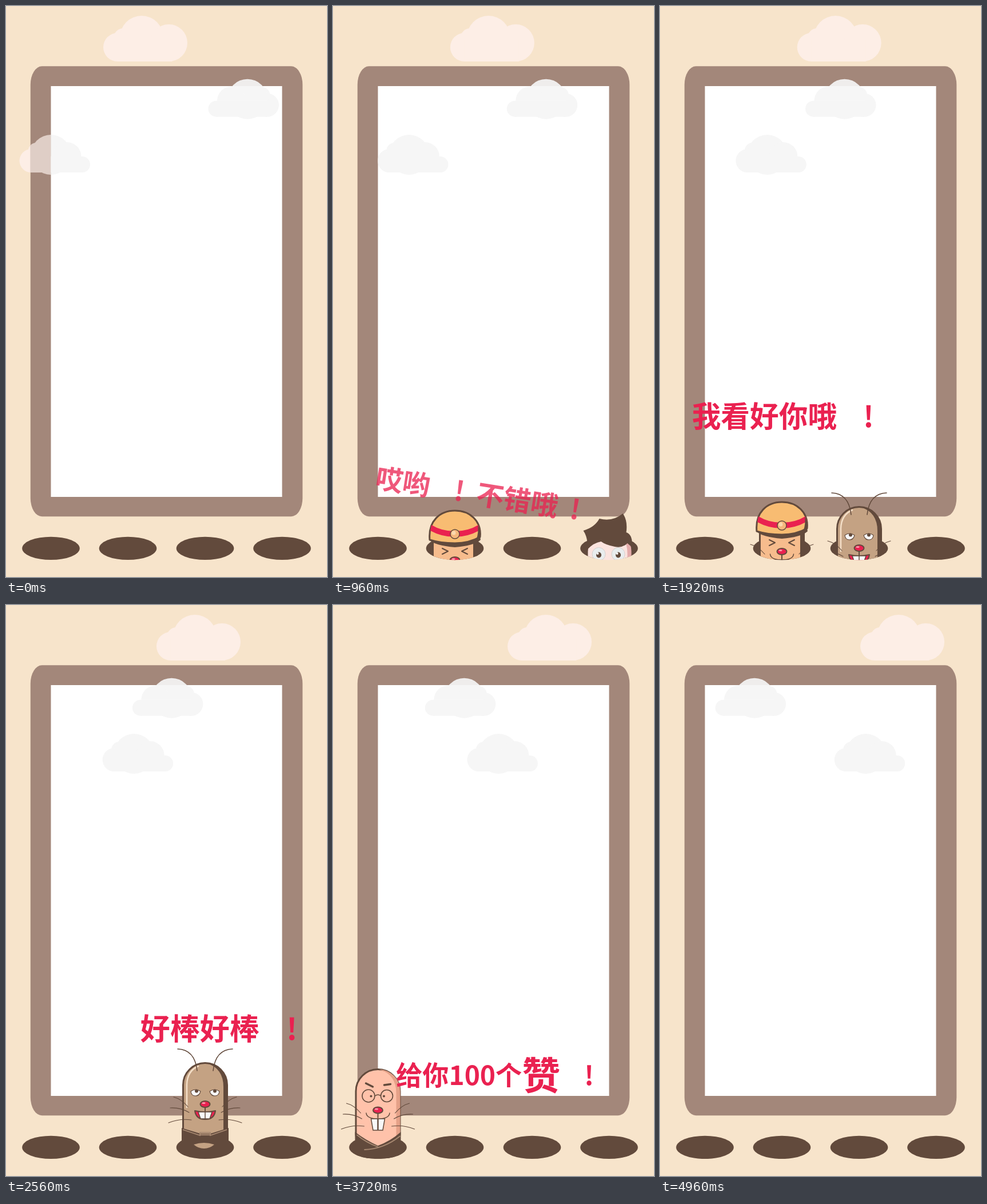
Write an HTML page that moves like this. It is 561x998 px and loops after 5 s.

```html
<!DOCTYPE html>
<html lang="zh">
<head>
<meta charset="utf-8">
<title>打地鼠</title>
<style>
html, body { margin: 0; width: 100%; height: 100%; overflow: hidden; background: #f7e4cb; }
svg { display: block; width: 100%; height: 100%; }
.ln { fill: none; stroke: #624a3c; stroke-width: 1.6; stroke-linecap: round; stroke-linejoin: round; }
.ol { stroke: #624a3c; stroke-width: 3; stroke-linejoin: round; }
.mid { stroke-width: 2; }
.thin { stroke-width: 1.5; }
.hair { stroke-width: 1.1; }
.bold { stroke-width: 3.4; }
.dk { fill: #624a3c; }
.red { fill: #ea2150; }
.wh { fill: #f8f8f9; }
.hem { fill: none; stroke: #a98a72; stroke-width: 1.8; }
text { font-family: "Noto Sans CJK SC", "Noto Sans CJK", sans-serif; font-weight: 900; fill: #ea2150; text-anchor: middle; white-space: pre; }
.big { font-size: 1.45em; }
</style>
</head>
<body>
<svg viewBox="0 0 561 998">
  <defs>
    <g id="puff">
      <circle cx="44" cy="270.5" r="20.5"/><circle cx="53" cy="253" r="14"/>
      <circle cx="78.5" cy="260" r="35"/><circle cx="106.5" cy="263" r="25"/>
      <circle cx="133" cy="277" r="14"/><path d="M44 263H133V291H44Z"/>
    </g>
    <clipPath id="pane"><path d="M78.5 140H482.5V858H78.5Z"/></clipPath>
    <clipPath id="edge"><path clip-rule="evenodd" d="M43 105H518V892H43ZM78.5 140V858H482.5V140Z"/></clipPath>
    <clipPath id="mouth"><path d="M-200 0H200V948H50.3A50.3 20.2 0 0 1-50.3 948H-200Z"/></clipPath>
  </defs>
  <rect width="561" height="998" fill="#f7e4cb"/>
  <g class="c1" fill="#fdeee6">
    <circle cx="195" cy="72" r="25"/><circle cx="205" cy="56" r="17"/><circle cx="237" cy="55" r="38"/>
    <circle cx="284.5" cy="64.5" r="32.5"/><path d="M195 60H290V97H195Z"/>
  </g>
  <use class="c3" href="#puff" fill="#fdeee6"/>
  <rect x="42.8" y="105.3" width="475.5" height="787" rx="20" ry="32" fill="#a3877a"/>
  <path d="M78.5 140H482.5V858H78.5Z" fill="#fff"/>
  <g clip-path="url(#edge)">
    <use class="c3" href="#puff" fill="#dfcec6"/>
    <use class="c2" href="#puff" fill="#efedec"/>
  </g>
  <g clip-path="url(#pane)" fill="#f6f6f6">
    <use class="c3" href="#puff"/>
    <use class="c2" href="#puff"/>
  </g>
  <g id="holes" class="dk"></g>
  <g id="moles"></g>
  <g id="words"></g>
</svg>
<script>
const LOOP = 5000, STEP = 40, SPEED = 0.5, DEPTH = 195;
const DARK = "#624a3c";
const $ = id => document.getElementById(id);
const clamp = v => Math.min(1, Math.max(0, v));

// Drawing parts; x is measured from the middle of the hole
const path = (cls, d, fill) => `<path class="${cls}" d="${d}"${fill ? ` fill="${fill}"` : ""}/>`;
const oval = (cls, x, y, rx, ry = rx) => `<ellipse class="${cls}" cx="${x}" cy="${y}" rx="${rx}" ry="${ry}"/>`;
const both = art => `<g>${art}</g><g transform="scale(-1 1)">${art}</g>`;

const body = (top, skin, shade) =>
  path("ol", `M-38.5 ${top + 38.5}a38.5 38.5 0 0 1 77 0V922a38.5 39 0 0 1-77 0Z`, skin) +
  path("", `M2 ${top}A38 38 0 0 1 39 ${top + 38}V922Q38 946 18 957Q32 944 32 922V${top + 42}Q32 ${top + 9} 2 ${top}Z`, shade);

const nose = y => path("ln mid", `M0 ${y}v13`) + oval("red ol mid", 0, y, 8.5, 5.5) +
  `<ellipse cx="-2.5" cy="${y - 2}" rx="3" ry="1.5" fill="#f79aa9"/>`;

const whiskers = (dy, lines = ["M30 888Q42 874 55 871", "M28 898Q43 889 61 890", "M24 911Q44 908 64 916"]) =>
  `<g transform="translate(0 ${dy})">${both(lines.map(d => path("ln hair", d)).join(""))}</g>`;

const grin = (y, len) => path("ln thin", `M-20.5 ${y - 10}q1 10 20.500 10t20.500-10`) +
  both(path("wh ol thin", `M.5 ${y}h11.5l-3.500 ${len}h-8z`));

const rocker = body(815, "#fbe3de", "#e5acab") +
  path("dk", "M-45 817Q-25 811-17 796Q6 802 24 787Q33 800 30 820Q42 824 40 846L32 839Q23 848 10 845Q-6 842-14 836Q-27 838-38 850V838Q-39 826-45 817Z") +
  [-18, 16].map(x => `<circle cx="${x}" cy="858" r="11.5" fill="#e9edee" stroke="#d3cfcd"/>` +
    oval("dk", x, 859.5, 4.5, 5) + oval("wh", x - 2, 857, 2)).join("") +
  path("ol", "M-17 893H18Q17 951 0 951T-17 893Z", "#c91a45") +
  path("", "M-15 900Q-15 912-13 919H14Q16 912 16 900Z", "#f2637a") +
  path("red", "M-13 921Q0 913 14 921Q10 949 0 949T-13 921Z") +
  path("wh ol thin", "M-10 894H11L9 907H-8ZM.5 894V907") +
  nose(881.5) + whiskers(-9, ["M28 898Q43 889 61 890", "M24 911Q44 908 64 916"]);

const miner = body(810, "#f6bc8d", DARK) +
  path("dk", "M-45 848Q-35 858 0 861Q35 858 45 848L41 835H-41Z") +
  path("ol", "M-44 848C-47 815-26 797 0 797S47 815 44 843Q25 854 0 854T-44 848Z", "#f8bc72") +
  path("red", "M-41 822Q-23 833 0 833T41 822L44 831Q23 843 0 843T-43 832Z") +
  path("dk", "M40 822Q47 835 44 848L36 851Q42 838 40 822Z") +
  `<g fill="#f5b77c">${oval("ol thin", 0, 838, 8)}</g><circle cx="-2" cy="836" r="3.5" fill="#fbd9ae"/>` +
  both(path("ln mid", "M22 863L12 868L22 873")) +
  grin(898, 28) + path("ln thin", "M0 926v10") + nose(883.5) + whiskers(0);

const bug = body(800.5, "#c4a283", DARK) +
  `<path d="M-32 878V838Q-31 814-12 806" fill="none" stroke="#f4dfc8" stroke-width="2.5" stroke-linecap="round"/>` +
  both(path("ln", "M14 814Q18 777 48 776") +
    path("wh ol hair", "M8 850Q17 844 25 850Q24 858 17 858T8 850Z")) +
  [-15, 17].map(x => oval("dk", x, 849.5, 3)).join("") +
  path("red ol mid", "M-18 884Q0 888 18 884Q16 899 0 899T-18 884Z") +
  path("wh ol thin", "M-12 886H12L8 898H-8ZM0 886V898") +
  nose(872.5) + whiskers(-11) +
  path("dk", "M-41 914L-8 924H9L41 914V962H-41Z") +
  path("hem", "M-39 917L-9 927V922H9V927L38 917M-9 926H9") +
  path("", "M-20 943Q-2 937 16 943Q8 950-2 950T-20 943Z", "#c4a283");

const scholar = body(808.5, "#ffc2aa", "#e5a188") +
  path("ln bold", "M-21 833L-9 839M11 836L22 834.5") +
  path("ln", "M-5 855q5-4 10 0") +
  oval("ln", -16.5, 855, 11) + oval("ln", 15.5, 855, 10.5) +
  oval("dk", -12, 855.5, 2) + oval("dk", 10.5, 855.5, 2) +
  grin(895, 20) + nose(880) + whiskers(-3) +
  path("dk", "M-40 918Q-22 932 0 942Q22 934 40 918V964H-40Z") +
  path("hem", "M-37 923Q-20 937 0 944M-24 949Q10 948 39 925");

// "at" is the moment the caption stands at (tx, ty) with scale 1
const moles = [
  { x: 482.5, up: 20, down: 760, art: rocker, say: "哎哟    !  不错哦  !", size: 46, at: 560, tx: 265, ty: 871, tilt: 9 },
  { x: 213, up: 740, down: 1780, art: miner, say: "我看好你哦    !", size: 48, at: 1360, tx: 231, ty: 743, tilt: 0 },
  { x: 348, up: 1680, down: 2600, art: bug, say: "好棒好棒    !", size: 52, at: 2560, tx: 372, ty: 741, tilt: 0 },
  { x: 78.5, up: 2500, down: 3714, art: scholar, size: 44, at: 3240, tx: 297, ty: 844, tilt: 0,
    say: '给你100个<tspan class="big" dy="8">赞</tspan><tspan dy="-8">    !</tspan>' }
];

$("holes").innerHTML = moles.map(m => oval("", m.x, 947.9, 50.3, 20.2)).join("");
$("moles").innerHTML = moles.map(m =>
  `<g transform="translate(${m.x})" clip-path="url(#mouth)"><g>${m.art}</g></g>`).join("");
$("words").innerHTML = moles.map(m =>
  `<g><text y="${m.size * .37}" font-size="${m.size}">${m.say}</text></g>`).join("");
moles.forEach((m, i) => {
  m.body = $("moles").children[i].firstChild;
  m.words = $("words").children[i];
});

const place = (el, v) => el.setAttribute("transform", v);
const clouds = [1, 2, 3].map(i => [...document.querySelectorAll(".c" + i)]);
const drift = [
  t => `translate(${t * .0363})`,
  t => `translate(${500.5 - t * .0518} -97.3) scale(-1 1)`,
  t => `translate(${t * .0567})`
];

function draw(t) {
  clouds.forEach((set, i) => set.forEach(el => place(el, drift[i](t))));
  for (const m of moles) {
    const drop = Math.max(0, DEPTH - (t - m.up) * SPEED, (t - m.down) * SPEED);
    place(m.body, `translate(0 ${drop})`);
    m.body.setAttribute("display", drop < DEPTH ? "inline" : "none");

    // captions pop out of the hole, then keep rising and growing slowly
    const pop = clamp((t - m.up - 260) / 200), gone = clamp((m.down + 320 - t) / 160);
    const age = t - m.at;
    const x = m.x + (m.tx - age * .029 - m.x) * pop;
    const y = 900 + (m.ty - age * .046 - 900) * pop;
    place(m.words, `translate(${x} ${y}) rotate(${m.tilt}) scale(${pop * (1 + age * 1e-4)})`);
    m.words.setAttribute("opacity", Math.min(pop, gone));
  }
}

const start = performance.now();
function tick() {
  const t = (performance.now() - start) % LOOP;
  draw(Math.floor(t / STEP) * STEP);
  requestAnimationFrame(tick);
}
tick();
</script>
</body>
</html>
```
